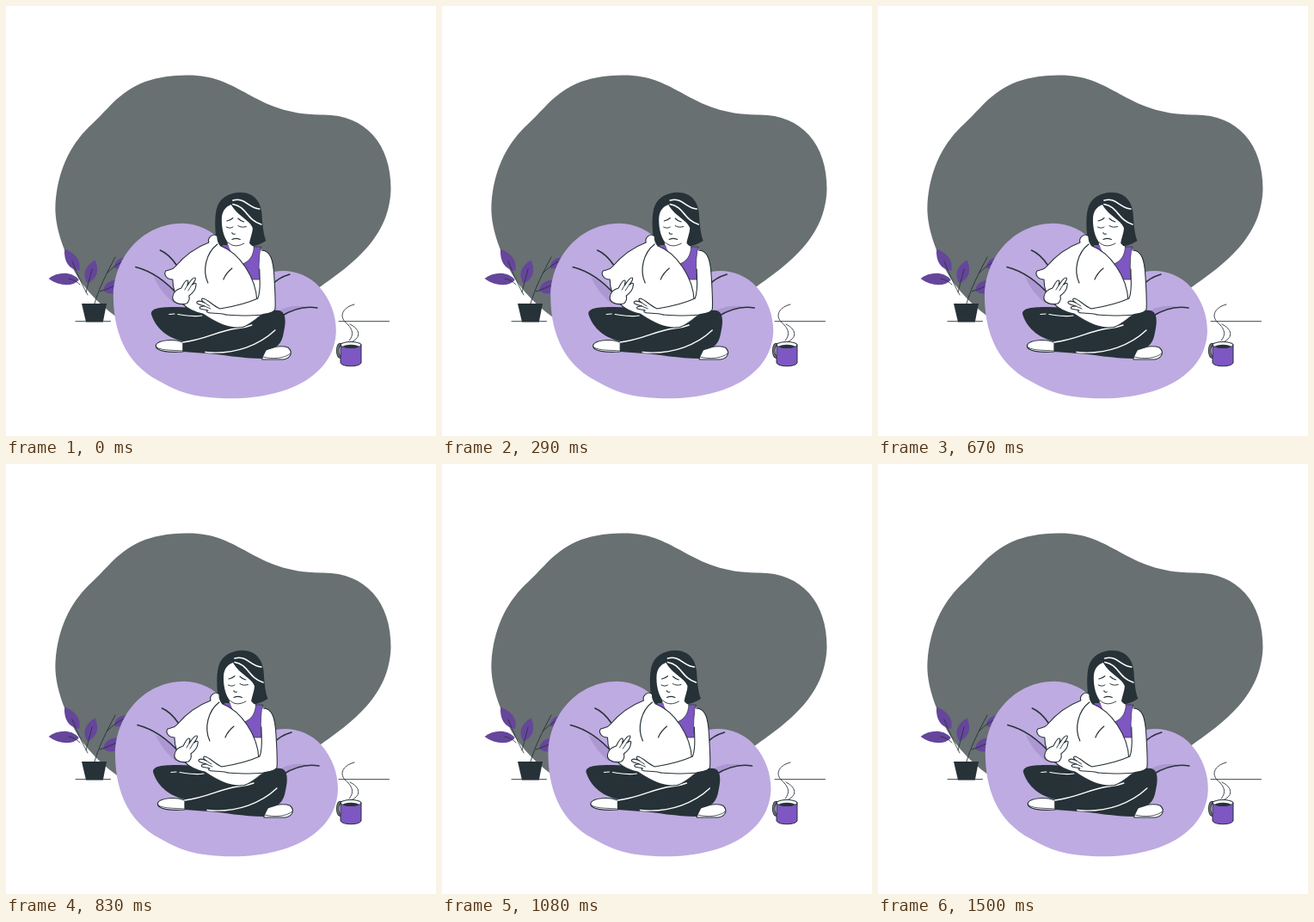
Write an HTML page with a canvas that moves like this. It is 500 px wide and 500 px high and loops after 1540 ms.

```html
<!DOCTYPE html>
<html lang="en">
<head>
<meta charset="utf-8">
<title>Comfort</title>
<style>
html, body { margin: 0; width: 100%; height: 100%; overflow: hidden; background: #fff; }
canvas { display: block; width: 500px; height: 500px; }
</style>
</head>
<body>
<canvas id="stage"></canvas>
<script>
const canvas = document.getElementById('stage');
const ctx = canvas.getContext('2d');
const ratio = window.devicePixelRatio || 1;
canvas.width = canvas.height = 500 * ratio;

const DARK = '#263238', GREY = '#687072', LILAC = '#beabe1', FOLD = '#ac97d2',
      PURPLE = '#7e57c2', LEAF = '#65469b', WHITE = '#fff';
const LOOP = 1540, STEP = 1000 / 24, SHAKE = 1500, LEAD = 28;
// Sideways offset at each tenth of the shake.
const OFFSETS = [0, -1, 2, -4, 4, -4, 4, -4, 2, -1, 0];

function fill(d, color) {
  ctx.fillStyle = color;
  ctx.fill(new Path2D(d));
}

function line(d, width = 1, color = DARK) {
  ctx.strokeStyle = color;
  ctx.lineWidth = width;
  ctx.stroke(new Path2D(d));
}

function shape(d, color = WHITE, width = 1.1) {
  fill(d, color);
  line(d, width);
}

function ellipse(x, y, rx, ry, color) {
  ctx.beginPath();
  ctx.ellipse(x, y, rx, ry, 0, 0, Math.PI * 2);
  ctx.fillStyle = color;
  ctx.fill();
}

function drawBackdrop() {
  fill('M210 80.5C240 80 258 90 277 100C305 116 328 126 366 126.5C417 125 448 160 447.5 213C446 269 403 300 364 327.5L250 400L150 375C122 360 99 339 84 316C66 285 56 255 57.5 230C60 192 74 163 96 141C106 132 112 125 120 117C142 94 165 81 210 80.5Z', GREY);
  line('M81 366.7H121.5M387 366.7H445.5', .9);
}

function drawPlant() {
  fill('M49.5 317C60 309 76 308 85 318.5C77 327 62 326 49.5 317Z', LEAF);
  fill('M68 282.5C80 287 88 296 85 308C73 306 67 297 68 282.5Z', LEAF);
  fill('M103.5 295.5C109 307 106 318 94.5 322.5C88 312 92 302 103.5 295.5Z', LEAF);
  fill('M126 305C126 296 133 291 146 292C144 303 136 306 126 305Z', LEAF);
  fill('M113 331C115 320 124 317 136 319C135 333 124 339 113 331Z', LEAF);
  line('M85 318.5L98 346', 1, WHITE);
  line('M77 297C82 310 88 323 95 336M73 317C78 318 82 320 86 324M100 306L93 333', .8);
  line('M103 346C108 328 117 311 127 292M117 311C125 303 131 299 138 296M109 332C116 330 122 327 129 324', .9);
  fill('M88 346H117L112.8 367.5H93Z', DARK);
}

function drawMug() {
  const handle = 'M389.5 394C384.5 391 384.5 410 389.5 408';
  line('M405 347C393 350 387 359 394 367C402 374 406 381 399 389M400 370C412 376 413 385 403 390', .9);
  line(handle, 3.6);
  line(handle, 1.8, '#767083');
  shape('M389 394V415C391 420 411 420 413 415V394Z', PURPLE, 1);
  ellipse(401, 394, 12.4, 4, DARK);
  ellipse(401, 394, 11.4, 3, WHITE);
  ellipse(401, 395.8, 9, 2, DARK);
}

function drawBag() {
  fill('M205 252.7C225 253 240 262 252 274C275 300 290 308 312 309C330 305 352 312 364 326C378 342 384 360 384 378C383 425 335 456 262 456.3C215 456 198 447 178 436C136 414 125 374 125 336C126.5 290 160 253 205 252.7Z', LILAC);
  fill('M172 315C178 328 186 338 196 346L200 336C191 326 182 319 172 315Z', FOLD);
  fill('M314 357C322 350 335 347 350 349.5C338 350 328 356 321 361Z', FOLD);
  line('M151 303.5C172 309 188 322 201 337M179.5 284C189 288 195 296 199 302', 1.6);
  line('M330 312C320 315 314 319 310 324M362 351C345 348 331 354 320 361', 1.6);
}

function drawLegs() {
  shape('M206 391C195 387 178 388 174.5 394C173 402 190 403 206 402Z');
  line('M175 397C183 401 195 400 205 401', .8);
  shape('M298 403C304 397 319 394 328 397C334 402 332 409 323 411H298Z');
  line('M299 408C310 411 324 410 331 404', .8);
  fill('M169 358C169 350 184 350 200 350L300 354H313C325 352 327 364 323 380C321 393 315 398 303 400L298 410C275 410 250 405 233 404L206 402V390C190 386 175 377 169 358Z', DARK);
  line('M206 391C232 388 249 377 268 375C275 374.5 280 373.5 286 371', 1.4, WHITE);
  line('M232 402.5C268 406 296 393 313 377', 1.4, WHITE);
  line('M190 358.5L196 358M200 358.5C210 360 218 362 228 360', 1.2, WHITE);
}

function drawHair() {
  fill('M246 279C243 262 242.5 247 245 236C248 223 260 216.8 273 216.8C288 217 296 227 297.5 240C298.5 252 299 264 302.5 273C296 277 290 279 284 280H258Z', DARK);
}

function drawTorso() {
  fill('M258 268H281C281 279 290 281 298 283L300 345H250V284L258 280Z', WHITE);
  fill('M252 278L259 278C260 284 264 288 267 291L253 284Z', PURPLE);
  shape('M288.5 280L297 280C294 292 294 303 295 318H284L275 300C283 297 288 291 288.5 280Z', PURPLE, .7);
}

function drawFace() {
  fill('M262 231C254 234 251 240 251 249C251 260 254 270 259 276C264 280.5 272 279.5 278 276L283 279C283 271 287 265 287 258C283 248 270 245 262 231Z', WHITE);
  line('M258.5 275C264 280.5 271 279.5 277 276', .9);
  line('M264 226C278 222 282 235 295 236M264 230.5C280 233 280 249 297 254', 1.6, WHITE);
  line('M257 250C260 249.5 262 248.5 264 246.5M270 247C272 249 274 250.5 277 251', 1.1);
  line('M256.5 257C259 258.5 262 258.5 264 257M270 255.5C273 257.5 276 257.5 279.5 256.5', 1);
  line('M263 263.5C263 265 264.5 265.5 266.5 265M263 271.5C266 270 269 270 272.5 271.5', 1.1);
}

function drawPillow() {
  shape('M236 275C234 269 242 263 246 268C246 272 247 276 250 279C271 287 291 315 292 343L300 358C292 362 286 370 275 373.5C259 376 244 368 229 358C211 355 194 341 194 318C187 318 183 312 186 308C191 306 194 307 197 303C208 290 220 281 236 275Z');
  line('M246 277C233 287 228 307 235 322M253 318C255 313 258 309 263 305', 1.2);
}

function drawArms() {
  // Far hand on the side of the pillow.
  shape('M194 338C195 332 200 329 204 328C207 323 208 319 211 319C213 319 211 324 211 325C214 321 217 315 220 316C222 317 218 322 217 324C220 321 222 322 221 325C221 330 217 334 213 337C214 341 213 344 210 346C202 348 193 345 194 338Z');
  line('M211 325L208 330M217 323L212 331', .9);
  // Near arm reaching around the front.
  fill('M296 284C308 284 311 296 312 314C313 333 314 346 313 353C309 359 288 359 264 360L240 355L250 351C268 349 284 345 293 340C296 326 295 311 295 300Z', WHITE);
  line('M297 284C308 284 311 296 312 314C313 333 314 346 313 353C309 360 285 361 256 359M295 306C295 319 297 330 293 340C282 345 268 349 249 352', 1.1);
  shape('M249 352C241 349 235 341 229 340C226 341 229 344 231 345C227 343 222 342 222 345C222 347 229 348 231 349C227 349 224 350 226 352C229 353 233 353 235 354C232 355 234 357 239 357C247 358 251 357 256 359');
  line('M231 345L237 349M231 349L238 352', .9);
}

function shakeOffset(time) {
  const at = (time + LEAD) % SHAKE / SHAKE * 10;
  const i = Math.floor(at);
  return OFFSETS[i] + (OFFSETS[i + 1] - OFFSETS[i]) * (at - i);
}

// The motion advances 24 times a second, on a 10 ms clock.
function snap(time) {
  return Math.floor((Math.floor(time / 10) * 10 + 4.9) / STEP) * STEP;
}

function draw(time) {
  ctx.setTransform(ratio, 0, 0, ratio, 0, 0);
  ctx.fillStyle = WHITE;
  ctx.fillRect(0, 0, 500, 500);
  ctx.lineCap = ctx.lineJoin = 'round';
  drawBackdrop();
  drawPlant();
  drawMug();
  ctx.translate(shakeOffset(snap(time)), 0);
  drawBag();
  drawLegs();
  drawHair();
  drawTorso();
  drawFace();
  drawPillow();
  drawArms();
}

let start;
function tick(now) {
  start ??= now;
  draw(Math.max(0, now - start) % LOOP);
  requestAnimationFrame(tick);
}
draw(0);
requestAnimationFrame(tick);
</script>
</body>
</html>
```
